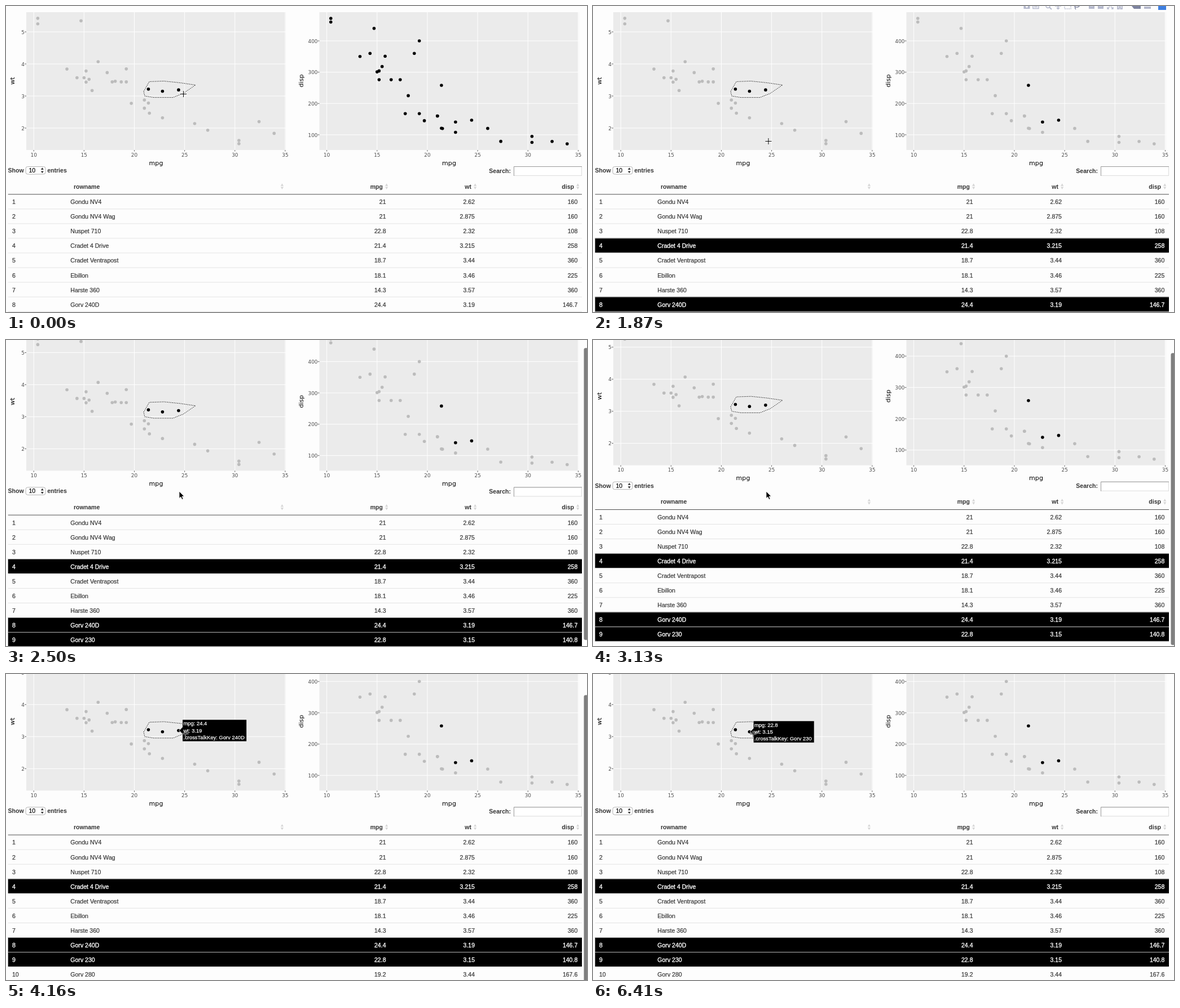
These frames come from a looping animation (1030x544 px, 8000 ms). An HTML page:

```html
<!DOCTYPE html>
<html lang="en">
<head>
<meta charset="utf-8">
<title>Linked plots and table</title>
<style>
  html, body { margin: 0; width: 100%; height: 100%; overflow: hidden; background: #fdfdfd; }
  svg { display: block; width: 100%; height: 100%; }
  text { font: 10.55px "Liberation Sans", Arial, sans-serif; fill: #333; white-space: pre; }
  .bold { font-weight: bold; }
  .tick { font: 8.9px "DejaVu Sans", Verdana, sans-serif; fill: #4d4d4d; }
  .title { font: 11.1px "DejaVu Sans", Verdana, sans-serif; fill: #000; }
  .end { text-anchor: end; }
  .mid { text-anchor: middle; }
  .row text { stroke: #333; stroke-width: .2px; }
  .on rect { fill: #000; }
  .on text { fill: #fff; stroke: #fff; stroke-width: .35px; }
  .tip text { font-size: 9.4px; fill: #fff; stroke: #fff; stroke-width: .25px; }
</style>
</head>
<body>
<svg viewBox="0 0 1030 544">
  <g id="page"></g>
  <rect id="bar" x="1024.5" width="8" height="519" rx="3"/>
  <g id="cursor">
    <g id="cross" fill="none">
      <path d="M-5.5 0H5.5M0 -5.5V5.5" stroke="#fff" stroke-width="2.4" stroke-opacity=".8"/>
      <path d="M-5.5 0H5.5M0 -5.5V5.5" stroke="#000"/>
    </g>
    <path id="arrow" d="M0 0V12.5L2.9 9.9L5 14.6L7.2 13.6L5.2 9.1H9Z" stroke="#fff" stroke-width=".9"/>
    <path id="hand" d="M-2.6 1V-5Q-1.8 -6.6 -.8 -5V-1Q.6 -2 1.2 -.6Q2.6 -1.4 3.2 0Q4.8 -.4 5 1V4L3.8 7H-1.8L-5 2.4Q-4.8 .4 -2.6 2.2M-.8 -1V1.5M1.2 -.6V1.6M3.2 0V1.8"
      fill="#fff" stroke="#000" stroke-width=".9"/>
  </g>
</svg>
<script>
const cars = [ // mpg, wt, disp
  [21, 2.62, 160], [21, 2.875, 160], [22.8, 2.32, 108], [21.4, 3.215, 258],
  [18.7, 3.44, 360], [18.1, 3.46, 225], [14.3, 3.57, 360], [24.4, 3.19, 146.7],
  [22.8, 3.15, 140.8], [19.2, 3.44, 167.6], [17.8, 3.44, 167.6], [16.4, 4.07, 275.8],
  [17.3, 3.73, 275.8], [15.2, 3.78, 275.8], [10.4, 5.25, 472], [10.4, 5.424, 460],
  [14.7, 5.345, 440], [32.4, 2.2, 78.7], [30.4, 1.615, 75.7], [33.9, 1.835, 71.1],
  [21.5, 2.465, 120.1], [15.5, 3.52, 318], [15.2, 3.435, 304], [13.3, 3.84, 350],
  [19.2, 3.845, 400], [27.3, 1.935, 79], [26, 2.14, 120.3], [30.4, 1.513, 95.1],
  [15.8, 3.17, 351], [19.7, 2.77, 145], [15, 3.57, 301], [21.4, 2.78, 121]];
const names = ['Gondu NV4', 'Gondu NV4 Wag', 'Nuspet 710', 'Cradet 4 Drive', 'Cradet Ventrapost',
  'Ebillon', 'Harste 360', 'Gorv 240D', 'Gorv 230', 'Gorv 280'];
const picked = [3, 7, 8];

const $ = id => document.getElementById(id);
const page = $('page');

function add(parent, tag, attrs, content) {
  const el = document.createElementNS('http://www.w3.org/2000/svg', tag);
  for (const k in attrs) el.setAttribute(k, attrs[k]);
  if (content !== undefined) el.textContent = content;
  return parent.appendChild(el);
}
const rect = (p, x, y, width, height, fill, more) => add(p, 'rect', {x, y, width, height, fill, ...more});
const text = (p, x, y, s, cls = '', more) => add(p, 'text', {x, y, class: cls, ...more}, s);
const path = (p, d, stroke, more) => add(p, 'path', {d, stroke, fill: 'none', ...more});
const show = (el, on) => { el.style.display = on ? '' : 'none'; };

const mpgX = m => 49.2 + (m - 10) * 17.83;
const wtY = w => 331 - 57 * w;
const dispY = d => 284.6 - .5565 * d;

function plot(dx, label, col, scaleY, ticks) {
  const g = add(page, 'g', {transform: `translate(${dx} 0)`});
  rect(g, 36, 11, 460, 245, '#ebebeb');
  for (const v of ticks) {
    const y = scaleY(v);
    path(g, `M36 ${y}H496`, '#fff');
    path(g, `M33.3 ${y}H36`, '#333', {'stroke-width': .8});
    text(g, 33, y + 3.7, v, 'tick end');
  }
  for (let m = 10; m <= 35; m += 5) {
    const x = mpgX(m);
    path(g, `M${x} 11V256`, '#fff');
    path(g, `M${x} 256V258.5`, '#333', {'stroke-width': .8});
    text(g, x, 267.7, m, 'tick mid');
  }
  text(g, 266, 282.6, 'mpg', 'title mid');
  const lx = dx ? 7 : 15;
  text(g, lx, 133, label, 'title mid', {transform: `rotate(-90 ${lx} 133)`});
  return cars.map(c => add(g, 'circle', {cx: mpgX(c[0]), cy: scaleY(c[col]), r: 2.8}));
}

function paint(dots, filtered) {
  dots.forEach((d, i) => d.setAttribute('fill', !filtered || picked.includes(i) ? '#000' : '#bcbcbc'));
}

const left = plot(0, 'wt', 1, wtY, [2, 3, 4, 5]);
const right = plot(519.5, 'disp', 2, dispY, [100, 200, 300, 400]);
paint(left, true);
const lasso = 'M244 152L254 134.4L280 133.5L308 136.4L336 140.5L314 155.5L296 162.6L262 162.6L246 160Z';
path(page, lasso, '#fff');
path(page, lasso, '#000', {'stroke-dasharray': '1.52 1.52'});

// Toolbar, cut off by the top edge
const tools = add(page, 'g', {});
const ink = '#b5b9cd';
rect(tools, 763.5, -4, 11, 9, ink);
add(tools, 'circle', {cx: 769, cy: 1, r: 2, fill: '#fdfdfd'});
path(tools, 'M780 -5V4.5H790V-5M782 1.5H788', ink, {'stroke-width': 1.5});
add(tools, 'circle', {cx: 806.5, cy: 0, r: 3.4, fill: 'none', stroke: ink, 'stroke-width': 1.6});
path(tools, 'M809 2L813 6', ink, {'stroke-width': 2});
path(tools, 'M819 0H830M824.5 -5V5M822 3L824.5 5.5L827 3', ink, {'stroke-width': 1.5});
path(tools, 'M836 -5V5H847V-5', ink, {'stroke-width': 1.4, 'stroke-dasharray': '2 1.4'});
path(tools, 'M853 -3Q853 3 859 2Q863 1 863 -3M856 1Q853 3 856 6', '#7d839f', {'stroke-width': 1.4});
for (const x of [879, 895]) {
  rect(tools, x, -5, 10, 10, ink);
  rect(tools, x + 2.5, -1, 5, 1.5, '#fdfdfd');
}
path(tools, 'M912 5L916 1M922 5L918 1M912 2V5H915M922 2V5H919', ink, {'stroke-width': 1.4});
path(tools, 'M930 -1V5H932.7V1.5H935.3V5H938V-1', ink, {'stroke-width': 1.8});
path(tools, 'M955 0L959 5H971V-5H959Z', 'none', {fill: '#7d839f'});
rect(tools, 977, 1, 12, 4, ink);
rect(tools, 1002, -7, 14, 14, '#3f7fe0');

// Table controls
text(page, 3.5, 296, 'Show', 'bold');
rect(page, 35, 285.5, 35, 13.5, '#fff', {rx: 3.5, stroke: '#aaa', 'stroke-width': .9});
text(page, 40.5, 296, '10', '', {style: 'fill:#000;stroke:#000;stroke-width:.2px'});
path(page, 'M61.8 291L64.3 287.3L66.8 291ZM61.8 293.6L64.3 297.3L66.8 293.6Z', 'none', {fill: '#333'});
text(page, 73.2, 296, 'entries', 'bold');
text(page, 895, 296.7, 'Search:', 'bold end');
rect(page, 900.5, 285.5, 120, 16, '#fff', {stroke: '#ddd'});
path(page, 'M900.5 302V285.5H1021', '#999');

// Table
function sorter(x) {
  path(page, `M${x - 2.6} 320L${x} 315.6L${x + 2.6} 320ZM${x - 2.6} 321.6L${x} 326L${x + 2.6} 321.6Z`,
    'none', {fill: '#d6d6d6'});
}
text(page, 120, 324.6, 'rowname', 'bold');
sorter(489.5);
[['mpg', 668], ['wt', 825], ['disp', 1007]].forEach(([s, x]) => {
  text(page, x, 324.6, s, 'bold end');
  sorter(x + 6.7);
});
const pitch = 26.06;
const rows = names.map((name, i) => {
  const y = 334.4 + pitch * i, base = y + 17.8, g = add(page, 'g', {class: 'row'});
  rect(g, 3.7, y, 1017.3, pitch, 'none');
  path(g, `M3.7 ${y + .4}H1021`, i ? '#ddd' : '#222', {'stroke-width': .8});
  text(g, 11, base, i + 1);
  text(g, 114.3, base, name);
  [673.5, 831, 1013.3].forEach((x, k) => text(g, x, base, cars[i][k], 'end'));
  return g;
});

// Hover labels for two of the points
function hover(i, width) {
  const [m, w] = cars[i], x = mpgX(m), y = wtY(w);
  const g = add(page, 'g', {class: 'tip'});
  path(g, `M${x + 1} ${y}L${x + 6.8} ${y - 6}V${y - 19.5}h${width}v39h${-width}V${y + 6}Z`, '#fff',
    {fill: '#000', 'stroke-width': .8});
  [`mpg: ${m}`, `wt: ${w}`, `.crossTalkKey: ${names[i]}`]
    .forEach((s, k) => text(g, x + 8.6, y - 9.1 + 12.4 * k, s));
  return g;
}
const tips = {7: hover(7, 114), 8: hover(8, 108)};

// time, scroll, pointer, x, y, hovered row
const steps = [
  [0, 0, 'cross', 314.5, 156.5], [670, 0, 'cross', 348, 167], [820, 0, 'cross', 381, 177],
  [1420, 0, 'cross', 372, 187], [1570, 0, 'cross', 348, 209], [1720, 0, 'cross', 322, 231],
  [1870, 0, 'cross', 311, 240.5],
  [2170, 0, 'arrow', 307, 268], [2340, 10, 'arrow', 307, 269], [2500, 23.6, 'arrow', 307, 269],
  [3130, 33.3, 'arrow', 307, 269], [3270, 43, 'hand', 309, 277], [3480, 48.7, 'hand', 309, 277],
  [3660, 48.7, 'arrow', 309, 228], [3810, 48.7, 'cross', 313, 150], [4010, 48.7, 'cross', 318, 112, 7],
  [4160, 48.7, 'cross', 318, 106, 7], [4310, 48.7, 'cross', 317, 105.5, 7], [4460, 48.7, 'cross', 316, 105.5, 7],
  [5960, 48.7, 'cross', 311, 106, 7], [6110, 48.7, 'cross', 299, 107, 7],
  [6260, 48.7, 'cross', 288, 106.5, 8], [6410, 48.7, 'cross', 284, 106.5, 8]];

function draw(t) {
  const [, scroll, pointer, x, y, tip] = steps.findLast(s => s[0] <= t);
  page.setAttribute('transform', `translate(0 ${-scroll})`);
  $('cursor').setAttribute('transform', `translate(${x} ${y})`);
  for (const id of ['cross', 'arrow', 'hand']) show($(id), id === pointer);
  for (const i in tips) show(tips[i], +i === tip);
  paint(right, t >= 150);
  show(tools, t >= 150 && t < 2170);
  picked.forEach(i => rows[i].classList.toggle('on', t >= 350));
  show($('bar'), t >= 2340 && t < 5210);
  $('bar').setAttribute('y', scroll * .93 - 7.7);
  $('bar').setAttribute('fill', t < 5060 ? '#7f7f7f' : '#b4b4b4');
}

function loop(now) {
  draw(now % 8000);
  requestAnimationFrame(loop);
}
draw(0);
requestAnimationFrame(loop);
</script>
</body>
</html>
```
